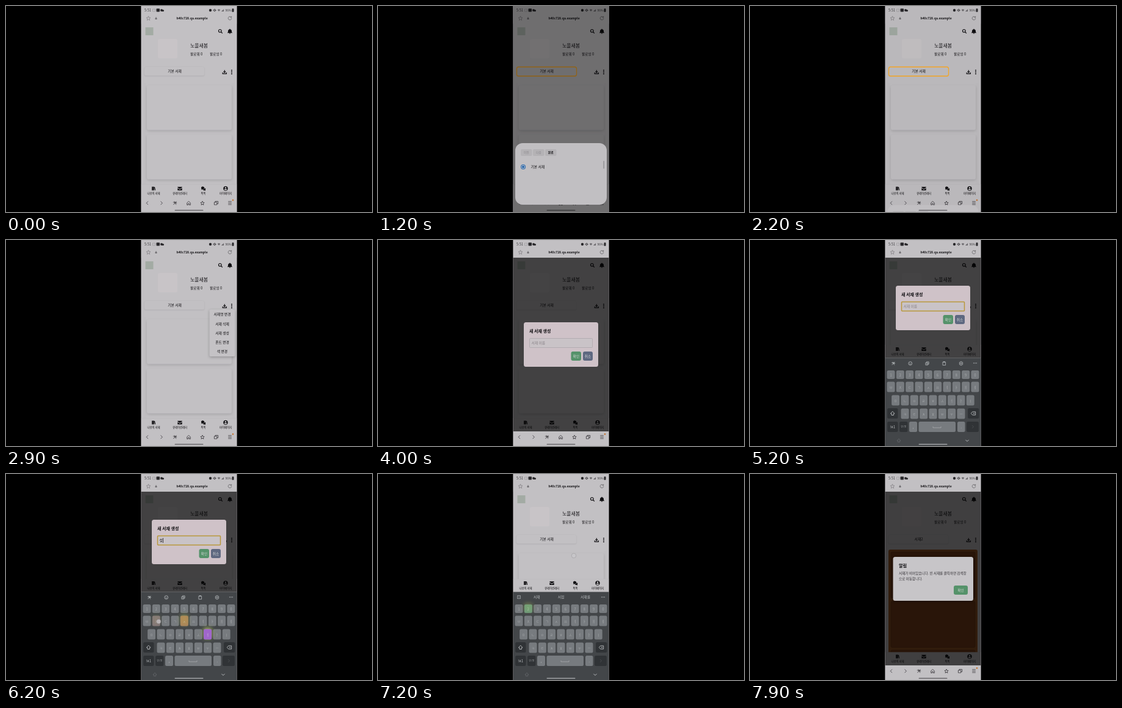
An HTML page with a canvas that plays this animation: 600 px wide and 338 px high, repeating every 8 s.

```html
<!DOCTYPE html>
<html lang="ko">
<head>
<meta charset="utf-8">
<title>Library app</title>
<style>
  html, body { margin: 0; width: 100%; height: 100%; overflow: hidden; background: #000; }
  canvas { display: block; }
</style>
</head>
<body>
<canvas id="stage" width="600" height="338"></canvas>
<script>
const ctx = document.getElementById('stage').getContext('2d');
const LOOP = 8000, LEFT = 221.5, WIDTH = 157, PAGE_TOP = 29;
const PAPER = '#c2c0c3', INK = '#100f12', GREEN = '#55926a';
const FONT = '"Noto Sans CJK KR", "Noto Sans CJK", "Noto Sans", sans-serif';

const clamp = v => Math.max(0, Math.min(1, v));
const ramp = (t, from, to) => clamp((t - from) / (to - from));
const smooth = p => p * p * (3 - 2 * p);
const easeOut = p => 1 - (1 - p) ** 3;

function box(x, y, w, h, r, fill, stroke, line = 1) {
  ctx.beginPath();
  ctx.roundRect(x, y, w, h, r);
  if (fill) { ctx.fillStyle = fill; ctx.fill(); }
  if (stroke) { ctx.strokeStyle = stroke; ctx.lineWidth = line; ctx.stroke(); }
}

function shadowed(blur, dy, alpha, draw) {
  ctx.save();
  ctx.shadowColor = `rgba(0,0,0,${alpha})`;
  ctx.shadowBlur = blur;
  ctx.shadowOffsetY = dy;
  draw();
  ctx.restore();
}

function faded(alpha, draw) {
  if (alpha <= 0) return;
  ctx.save();
  ctx.globalAlpha *= alpha;
  draw();
  ctx.restore();
}

function text(s, x, y, size, color = INK, align = 'center', weight = 500) {
  ctx.font = `${weight} ${size}px ${FONT}`;
  ctx.textAlign = align;
  ctx.textBaseline = 'middle';
  ctx.fillStyle = color;
  ctx.fillText(s, x, y);
}

function dot(x, y, r, color) {
  ctx.beginPath();
  ctx.arc(x, y, r, 0, 7);
  ctx.fillStyle = color;
  ctx.fill();
}

// Icons live on a 24-unit grid centred on the given point.
const ring = (x, y, r) => `M${x - r} ${y}a${r} ${r} 0 1 0 ${2 * r} 0a${r} ${r} 0 1 0 ${-2 * r} 0z`;
const icons = {
  star: 'M12 2l3 7 7 .6-5.400 4.800 1.700 7.600-6.300-4-6.300 4 1.700-7.600L2 9.600 9 9z',
  lock: 'M4 10h16v12H4zM7 10V7a5 5 0 0 1 10 0v3h-3V7a2 2 0 0 0-4 0v3z',
  reload: 'M20 7a9.500 9.500 0 1 0 1.500 6M21 1v7h-7',
  search: ring(10, 10, 7) + 'M15 15l7 7',
  bell: 'M12 1a2 2 0 0 1 2 2c4 1 6 4 6 8 0 4 1 5 3 8H1c2-3 3-4 3-8 0-4 2-7 6-8a2 2 0 0 1 2-2zM9 20h6a3 3 0 0 1-6 0z',
  save: 'M12 2v13M6 10l6 6 6-6M2 15v7h20v-7',
  books: 'M2 2h6v20H2zM9 2h6v20H9zM15 4l4-1 4 18-4 1z',
  mail: 'M1 4h22v3l-11 7L1 7zM1 10l11 7 11-7v11H1z',
  chat: 'M9 2c5 0 8 3 8 7s-3 7-8 7l-7 2 1-5C-1 7 3 2 9 2zM19 9c5 3 5 7 3 9l1 5-6-2c-4 0-7-2-8-4 6 0 10-3 10-8z',
  user: ring(12, 12, 11),
  back: 'M15 3l-9 9 9 9',
  next: 'M9 3l9 9-9 9',
  spark: 'M2 8h18M9 3l2 9-7 9M11 12l8 9M20 4l-9 8h11',
  home: 'M3 11l9-8 9 8v11h-6v-7H9v7H3z',
  tabs: 'M2 8h14v13H2zM7 8V3h15v13h-6',
  menu: 'M3 4h18M3 12h18M3 20h18',
  smile: ring(12, 12, 10) + 'M7 14q5 6 10 0M8 8v2M16 8v2',
  copy: 'M3 8h13v13H3zM8 8V3h13v13h-5M6 15h7',
  clip: 'M4 4h16v18H4zM9 2h6v4H9z',
  gear: 'M12 1l9 5v12l-9 5-9-5V6z' + ring(12, 12, 4),
  shift: 'M12 2l10 11h-5v8H7v-8H2z',
  erase: 'M8 4h15v16H8l-7-8zM12 9l6 6M18 9l-6 6',
  down: 'M3 8l9 9 9-9',
  panel: 'M3 3h18v18H3zM10 8l4 4-4 4',
  wifi: 'M1 8q11-10 22 0L12 22z',
  bars: 'M2 22L22 2v20z',
  mute: 'M2 8h5l7-6v20l-7-6H2zM17 8l6 8M23 8l-6 8',
};
for (const name in icons) icons[name] = new Path2D(icons[name]);

function icon(name, x, y, size, color = INK, line = 0) {
  const k = size / 24;
  ctx.save();
  ctx.translate(x - size / 2, y - size / 2);
  ctx.scale(k, k);
  if (line) {
    ctx.strokeStyle = color;
    ctx.lineWidth = line / k;
    ctx.stroke(icons[name]);
  } else {
    ctx.fillStyle = color;
    ctx.fill(icons[name]);
  }
  ctx.restore();
}

const dots = (x, y, dx, dy, r, color) => [-1, 0, 1].forEach(i => dot(x + i * dx, y + i * dy, r, color));

function browserTop() {
  box(LEFT, 0, WIDTH, PAGE_TOP, 0, PAPER);
  text('5:51', 227, 7, 5.600, '#39383b', 'left', 400);
  box(240.500, 5, 4, 4, 0, null, '#8c8a8e', .5);
  box(246.500, 4.300, 5.500, 5.200, 1, '#29282b');
  dot(255, 7, 2, '#29282b');
  dot(257.300, 7.600, 1.700, '#29282b');
  dot(335, 7, 2.200, '#29282b');
  icon('mute', 342, 7, 5, '#29282b', .7);
  icon('wifi', 349, 7, 5, '#6b696d');
  icon('bars', 355, 7, 5, '#6b696d');
  text('96%', 364.500, 7, 5, '#39383b', 'center', 400);
  box(370.500, 4.300, 3, 5.400, .7, '#29282b');
  icon('star', 233.500, 20, 8, '#7b797d', .7);
  icon('lock', 246, 20, 4.500, '#6d6b6f');
  text('h40c728.qa.example', 305, 20, 5, INK, 'center', 700);
  icon('reload', 367, 20, 7, '#555357', .7);
}

function browserBottom() {
  box(LEFT, 314, WIDTH, 24, 0, PAPER);
  ['back', 'next', 'spark', 'home', 'star', 'tabs', 'menu'].forEach((name, i) =>
    icon(name, 232 + i * 22.500, 323.300, 7.500, '#353338', .8));
  dot(372, 318.500, 1.200, '#c86f25');
}

function shelf(brown) {
  if (brown) {
    box(227, 124, 146, 190, 3, '#965526');
    [128, 209, 289].forEach(y => box(231, y, 138, 75.500, 2, '#7c411a', '#6a3615', .8));
    return;
  }
  box(226, 126, 4, 188, 2, '#c0bec1');
  box(370, 126, 4, 188, 2, '#c0bec1');
  [130, 211].forEach(y => shadowed(4, 2, .13, () => box(231, y, 139, 73.500, 3, PAPER)));
}

function page(t, bottom) {
  const made = t >= 7600;
  ctx.save();
  ctx.beginPath();
  ctx.rect(LEFT, PAGE_TOP, WIDTH, bottom - PAGE_TOP);
  ctx.clip();
  box(LEFT, PAGE_TOP, WIDTH, 300, 0, PAPER);
  box(228.500, 35, 13, 13, 0, '#a3aba4');
  icon('search', 351.500, 41.500, 8, INK, 1.200);
  icon('bell', 367, 41.500, 9);
  box(249, 54, 32, 32, 3, '#c8c4c7');
  text('노을새봄', 316.500, 65, 7.800);
  text('팔로워 0', 312, 79, 5.700);
  text('팔로잉 0', 344, 79, 5.700);

  const focused = t >= 920 && t < 2700;
  shadowed(2, .5, .14, () => box(227, 100, 98, 14.500, 2.500, PAPER));
  if (focused) box(227.500, 100, 98, 15, 3, null, '#ffae28', 1.300);
  text(made ? '서재2' : '기본 서재', 276.500, 107, 5.800);
  icon('save', 358.300, 108, 7.500, INK, 1.100);
  dots(370, 108.300, 0, 2.900, 1, INK);
  shelf(made);

  const nav = bottom - 21.500;
  box(LEFT, nav, WIDTH, 22, 0, PAPER);
  box(LEFT, nav, WIDTH, .5, 0, '#b9b7ba');
  [['books', '나만의 서재', 242], ['mail', '큐레이션레터', 285], ['chat', '톡톡', 323.500], ['user', '마이페이지', 360]]
    .forEach(([name, label, x]) => {
      icon(name, x, bottom - 14.500, name === 'books' ? 7 : 8);
      text(label, x, bottom - 6.300, 4.400);
    });
  dot(360, bottom - 15.800, 1.300, PAPER);
  box(357.800, bottom - 13.800, 4.400, 2, 1, PAPER);
  ctx.restore();
}

function dim(alpha, y, bottom) {
  box(LEFT, y, WIDTH, bottom - y, 0, `rgba(0,0,0,${alpha})`);
}

function menu() {
  shadowed(4, 1.500, .25, () => box(333.500, 114, 42, 77, 2, '#c4c2c5'));
  ['서재명 변경', '서재 삭제', '서재 생성', '폰트 변경', '색 변경'].forEach((label, i) =>
    text(label, 354.500, 122 + i * 15.300, 5.800));
}

function button(label, x, y, w, color) {
  box(x, y, w, 15, 3, color);
  text(label, x + w / 2, y + 7.500, 5.800, '#d2d6d4');
}

const typed = [[6700, '서재2'], [6400, '서재'], [6170, '섲'], [5950, '서'], [5750, 'ㅅ']];

function nameDialog(t, dy) {
  ctx.save();
  ctx.translate(0, dy);
  box(239, 75, 122, 73, 3.500, '#cfc2c8');
  text('새 서재 생성', 248, 89, 7, INK, 'left', 700);
  const focused = t >= 4560;
  box(248.500, 101.500, 103, 15, 1, '#c9c3c7', focused ? '#b8973a' : '#aaa4a8', focused ? 1.500 : .7);
  const value = typed.find(([at]) => t >= at)?.[1] || '';
  text(value || '서재 이름', 251.500, 109, 5.800, value ? INK : '#8a8488', 'left');
  if (focused && (t - 4560) % 1000 < 500 || value && t < 6900) {
    const x = 251.200 + (value ? ctx.measureText(value).width + .5 : 0);
    box(x, 105, .7, 8, 0, INK);
  }
  button('확인', 316.500, 123, 16.500, GREEN);
  button('취소', 336, 123, 16, '#5e6880');
  ctx.restore();
}

function alertBox() {
  shadowed(4, 1, .4, () => box(234.500, 136, 131.500, 72, 3.500, '#c7c5c8'));
  text('알림', 244, 150, 7.200, INK, 'left', 700);
  text('서재가 비어있습니다. 빈 서재를 클릭하면 검색창', 244, 163, 5.600, '#343236', 'left');
  text('으로 이동합니다.', 244, 172.300, 5.600, '#343236', 'left');
  button('확인', 334, 183, 23, GREEN);
}

function sheet(p) {
  ctx.save();
  ctx.translate(0, (1 - p) * 113);
  box(225, 225, 150, 101, 12, '#c1bfc2');
  ['이전', '다음', '완료'].forEach((label, i) => {
    box(234 + i * 20, 235, 18.500, 11, 2, '#b4b2b5');
    text(label, 243.200 + i * 20, 240.500, 4.800, i < 2 ? '#88868a' : INK, 'center', i < 2 ? 400 : 700);
  });
  dot(238, 264, 4, '#2468b0');
  dot(238, 264, 3, '#c1bfc2');
  dot(238, 264, 2.100, '#2468b0');
  text('기본 서재', 250.500, 264, 5.800, INK, 'left');
  box(369.300, 254, 1.800, 13, 1, '#98979b');
  ctx.restore();
}

// Each row: key caps, centre of the first key, centre line, key height.
const rows = [
  ['1234567890', 231, 221, 14],
  ['ㅂㅈㄷㄱㅅㅛㅕㅑㅐㅔ', 231, 241, 17],
  ['ㅁㄴㅇㄹㅎㅗㅓㅏㅣ', 238.600, 263, 17],
  ['ㅋㅌㅊㅍㅠㅜㅡ', 254, 285, 17],
];
const PITCH = 15.330;
const presses = [
  [5750, 1, 4, '#cc8744'], [5950, 2, 6, '#a066cc'], [6170, 1, 1, '#b85c5c'],
  [6400, 1, 8, '#5b83c4'], [6700, 0, 1, '#5fb377'],
];

function keyboard(t, dy) {
  ctx.save();
  ctx.translate(0, dy);
  box(LEFT, 193.500, WIDTH, 145, 0, '#434649');
  const pale = '#b7babd', cap = '#777b7f', dark = '#303336';
  if (t >= 6400) {
    icon('panel', 231, 202, 6.500, pale, .7);
    ['서재', '서점', '서재를'].forEach((word, i) => text(word, 260 + i * 40, 202, 5.800, pale));
  } else {
    ['spark', 'smile', 'copy', 'clip', 'gear'].forEach((name, i) =>
      icon(name, 235 + i * 27.750, 202.500, 7, pale, .8));
  }
  dots(369, 202, 2.300, 0, .7, pale);

  rows.forEach(([caps, x0, y, h]) => [...caps].forEach((c, i) => {
    const x = x0 + i * PITCH;
    box(x - 6.500, y - h / 2, 13, h, 2.500, cap);
    text(c, x, y + .5, 5.500, '#a8abae', 'center', 400);
  }));
  [[225, 276, 17.500], [357, 276, 18.500], [225, 298, 17.500], [245, 298, 13.500], [355, 298, 20]]
    .forEach(([x, y, w]) => box(x, y, w, 17, 2.500, dark));
  [[261, 13], [276.500, 60.500], [340, 12.500]].forEach(([x, w]) => box(x, 298, w, 17, 2.500, cap));
  icon('shift', 233.700, 284.500, 8, pale, .9);
  icon('erase', 366, 284.500, 8, pale, .9);
  text('!#1', 233.700, 306.500, 6, pale);
  text('한/영', 251.700, 306.500, 4, '#96999c');
  text(',', 267.500, 306, 7, pale);
  text('.', 346.200, 306, 7, pale);
  ctx.beginPath();
  ctx.moveTo(300, 306);
  ctx.lineTo(300, 308);
  ctx.lineTo(313, 308);
  ctx.lineTo(313, 306);
  ctx.strokeStyle = '#a8abae';
  ctx.lineWidth = .8;
  ctx.stroke();
  icon('next', 365, 306.500, 6, '#505356', .8);
  icon('shift', 244, 329, 7, '#65686b', .8);
  icon('down', 356, 329, 7, pale, 1);

  presses.forEach(([at, row, i, color]) => {
    const [caps, x0, y, h] = rows[row], x = x0 + i * PITCH;
    faded(ramp(t, at, at + 180) * (1 - ramp(t, at + 250, at + 700)), () => {
      ctx.save();
      ctx.shadowColor = '#a5b85c';
      ctx.shadowBlur = 6;
      ctx.shadowOffsetY = -2;
      box(x - 6.500, y - h / 2, 13, h, 2.500, color);
      ctx.restore();
      text(caps[i], x, y + .5, 5.500, '#c9cbcd', 'center', 400);
    });
  });
  ctx.restore();
}

const taps = [
  [880, 276, 108], [1880, 283, 240], [2680, 369, 108], [3580, 354, 153], [4560, 315, 170.500],
  ...presses.map(([at, row, i]) => [at, rows[row][1] + i * PITCH + 4, rows[row][2] + 1]),
  [7060, 321, 134],
];

function touches(t) {
  taps.forEach(([at, x, y]) => {
    if (t < at || t > at + 210) return;
    faded(1 - ramp(t, at + 120, at + 210), () => {
      dot(x, y, 3.800, 'rgba(205,203,207,.7)');
      ctx.strokeStyle = 'rgba(90,88,92,.5)';
      ctx.lineWidth = .6;
      ctx.stroke();
    });
  });
}

function render(t) {
  const typing = t >= 4600 && t < 7300;
  const bottom = typing ? 193.500 : 314;
  box(0, 0, 600, 338, 0, '#000');
  box(LEFT, 0, WIDTH, 338, 0, '#c4c2c5');
  ctx.save();
  ctx.beginPath();
  ctx.rect(LEFT, 0, WIDTH, 338);
  ctx.clip();

  browserTop();
  if (!typing) browserBottom();
  page(t, bottom);
  faded(ramp(t, 2740, 2840) - ramp(t, 3660, 3740), menu);

  faded(ramp(t, 3700, 3850) - ramp(t, 7100, 7190), () => {
    dim(.66, PAGE_TOP, bottom);
    nameDialog(t, typing ? 0 : 60);
  });
  faded(ramp(t, 7680, 7830), () => {
    dim(.67, PAGE_TOP, bottom);
    alertBox();
  });

  const raised = smooth(ramp(t, 4600, 4930)) - smooth(ramp(t, 7280, 7560));
  if (raised > 0) keyboard(t, (1 - raised) * 145);

  const open = easeOut(ramp(t, 970, 1190)) - smooth(ramp(t, 2000, 2250));
  if (open > 0) {
    dim(.43 * open, 0, 338);
    sheet(open);
  }
  touches(t);
  box(276.500, 334.500, 47, 1.400, .7, raised > .1 ? '#a0a2a5' : open > .5 ? '#39383a' : '#69676b');
  ctx.restore();
}

function tick(now) {
  render(now % LOOP);
  requestAnimationFrame(tick);
}
requestAnimationFrame(tick);
</script>
</body>
</html>
```
